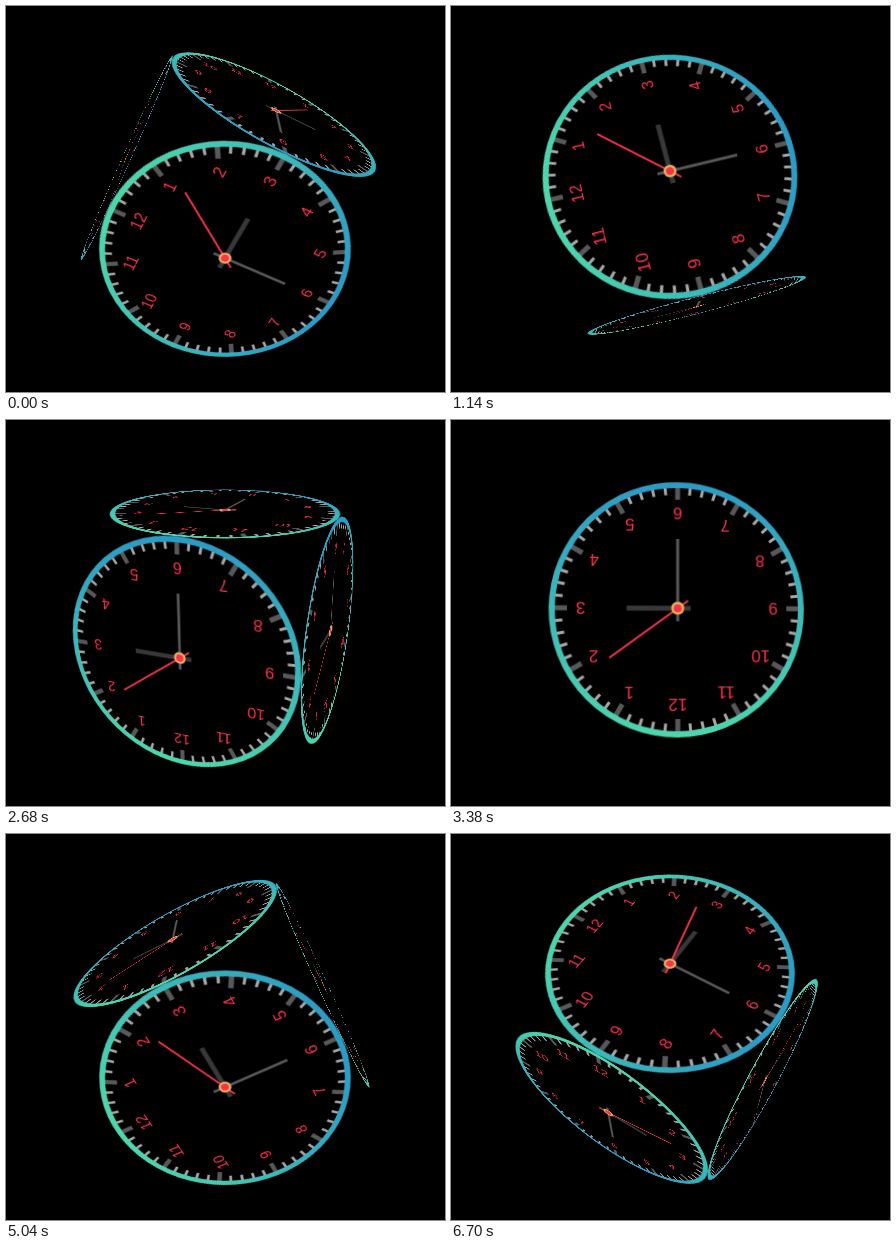
Animation, 439 px wide and 386 px high, one loop 6800 ms. Source, as an HTML page:

```html
<!DOCTYPE html>
<html lang="en">
<head>
<meta charset="utf-8">
<title>Clock cube</title>
<style>
  html, body { margin: 0; width: 100%; height: 100%; overflow: hidden; background: #000; }
  .scene {
    position: absolute; left: 0; top: 0; width: 439px; height: 386px; overflow: hidden;
    perspective: 650px; perspective-origin: 218.5px 196px;
  }
  .cube {
    position: absolute; left: 90.5px; top: 68px; width: 256px; height: 256px;
    transform-style: preserve-3d;
    animation: spin 6.8s infinite;
  }
  .face {
    position: absolute; left: 0; top: 0; width: 256px; height: 256px;
    backface-visibility: hidden;
  }
  text {
    font: 17px "Liberation Sans", Arial, sans-serif;
    fill: #fb314d; text-anchor: middle;
  }
  .second { animation: tick 6.8s infinite; }

  /* The turn advances in small holds, about seven a second */
  @keyframes spin {
    0% { transform: translateZ(-128px) rotateX(63.4deg) rotateY(-63.4deg); animation-timing-function: steps(10); }
    18.4% { transform: translateZ(-128px) rotateX(108.6deg) rotateY(-108.6deg); animation-timing-function: steps(8); }
    34.85% { transform: translateZ(-128px) rotateX(148.9deg) rotateY(-148.9deg); animation-timing-function: steps(8); }
    51.25% { transform: translateZ(-128px) rotateX(188.4deg) rotateY(-188.4deg); animation-timing-function: steps(8); }
    67.5% { transform: translateZ(-128px) rotateX(227.8deg) rotateY(-227.8deg); animation-timing-function: steps(8); }
    84.2% { transform: translateZ(-128px) rotateX(268deg) rotateY(-268deg); animation-timing-function: steps(8); }
    100% { transform: translateZ(-128px) rotateX(307.2deg) rotateY(-307.2deg); }
  }
  @keyframes tick {
    0% { transform: rotate(36deg); animation-timing-function: step-end; }
    7.35% { transform: rotate(42deg); animation-timing-function: steps(6); }
    94.56%, 100% { transform: rotate(78deg); }
  }
</style>
</head>
<body>
<div class="scene"><div class="cube"></div></div>
<script>
  const sides = ['rotateY(0deg)', 'rotateY(90deg)', 'rotateY(180deg)',
                 'rotateY(-90deg)', 'rotateX(90deg)', 'rotateX(-90deg)'];

  const line = (y1, y2, color, width, angle = 0) =>
    `<line y1="${y1}" y2="${y2}" stroke="${color}" stroke-width="${width}" transform="rotate(${angle})"/>`;

  function ticks() {
    let out = '';
    for (let i = 0; i < 60; i++) {
      out += i % 5 ? line(-123, -115, '#a6a6a6', 3, i * 6)
                   : line(-123, -110, '#58585a', 5, i * 6);
    }
    return out;
  }

  function numbers() {
    let out = '';
    for (let n = 1; n <= 12; n++) {
      const a = n * Math.PI / 6;
      const x = 96.5 * Math.sin(a), y = 6 - 96.5 * Math.cos(a);
      out += `<text x="${x.toFixed(2)}" y="${y.toFixed(2)}">${n}</text>`;
    }
    return out;
  }

  const dial = ticks() + numbers() +
    '<circle r="125" fill="none" stroke="url(#rim)" stroke-width="6"/>' +
    line(13, -51, '#38383a', 5, 90) +
    line(13, -70, '#58585a', 3, 180) +
    `<g class="second">${line(13, -84, '#fb314d', 2)}</g>` +
    '<circle r="5.3" fill="#fb314d" stroke="#e5ae56" stroke-width="2.6"/>';

  const rim = `<defs><linearGradient id="rim" gradientUnits="userSpaceOnUse" x1="0" y1="-128" x2="0" y2="128">
    <stop stop-color="#4ed6ac"/><stop offset="1" stop-color="#2c9ac4"/></linearGradient></defs>`;

  document.querySelector('.cube').innerHTML = sides.map((turn, i) =>
    `<svg class="face" viewBox="-128 -128 256 256" style="transform:${turn} translateZ(128px)">${i ? '' : rim}${dial}</svg>`
  ).join('');
</script>
</body>
</html>
```
